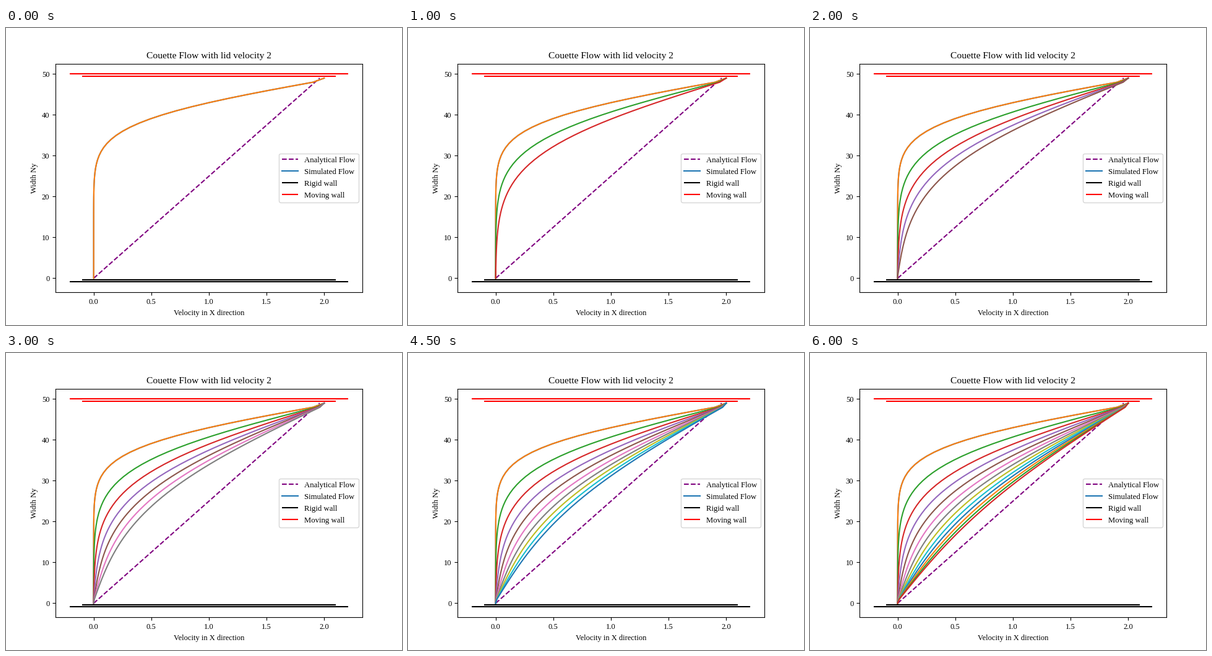
Animation, 640 px wide and 480 px high, one loop 9.5 s. Source, as a matplotlib script:

```python
import numpy as np
import matplotlib.pyplot as plt
from matplotlib.animation import FuncAnimation

LID = 2.0
ROWS = 50
STEPS_PER_CURVE = 200
CURVES = 13
FRAMES = 19

plt.rcParams.update({
    "font.family": "Liberation Serif",
    "font.size": 9,
    "axes.titlesize": 11.15,
    "figure.dpi": 100,
})


def diffuse(u):
    """One step of shear diffusion between walls halfway past the inner rows."""
    inner = u[1:-1]
    padded = np.concatenate(([-inner[0]], inner, [2 * LID - inner[-1]]))
    u[1:-1] = inner * 2 / 3 + (padded[:-2] + padded[2:]) / 6


def velocity_profiles():
    u = np.zeros(ROWS)
    u[-1] = LID
    profiles = []
    for _ in range(CURVES):
        for _ in range(STEPS_PER_CURVE):
            diffuse(u)
        profiles.append(u.copy())
    return profiles


fig, ax = plt.subplots(figsize=(6.4, 4.8))
height = np.arange(ROWS)
profiles = velocity_profiles()

analytical, = ax.plot(LID * height / ROWS, height, "--", color="purple")
simulated, = ax.plot(profiles[0], height, color="C0")
curves = [ax.plot(u, height, color=f"C{k % 10}")[0]
          for k, u in enumerate(profiles, start=1)]


def wall(levels, color):
    spans = ((-0.1, 2.1), (-0.21, 2.21))
    return [ax.hlines(y, *span, color=color) for y, span in zip(levels, spans)][0]


rigid = wall((-0.4, -0.9), "black")
moving = wall((49.5, 50), "red")

ax.set_xlim(-0.331, 2.331)
ax.set_ylim(-3.445, 52.545)
ax.set_title("Couette Flow with lid velocity 2")
ax.set_xlabel("Velocity in X direction", labelpad=4.5)
ax.set_ylabel("Width Ny", labelpad=4.5)
ax.legend([analytical, simulated, rigid, moving],
          ["Analytical Flow", "Simulated Flow", "Rigid wall", "Moving wall"],
          loc="center right", fontsize=9.2, labelspacing=0.55)


def update(frame):
    for k, curve in enumerate(curves):
        curve.set_visible(k <= frame)
    return curves


anim = FuncAnimation(fig, update, frames=FRAMES, interval=500,
                     repeat=True, repeat_delay=0, blit=False)
plt.show()
```
